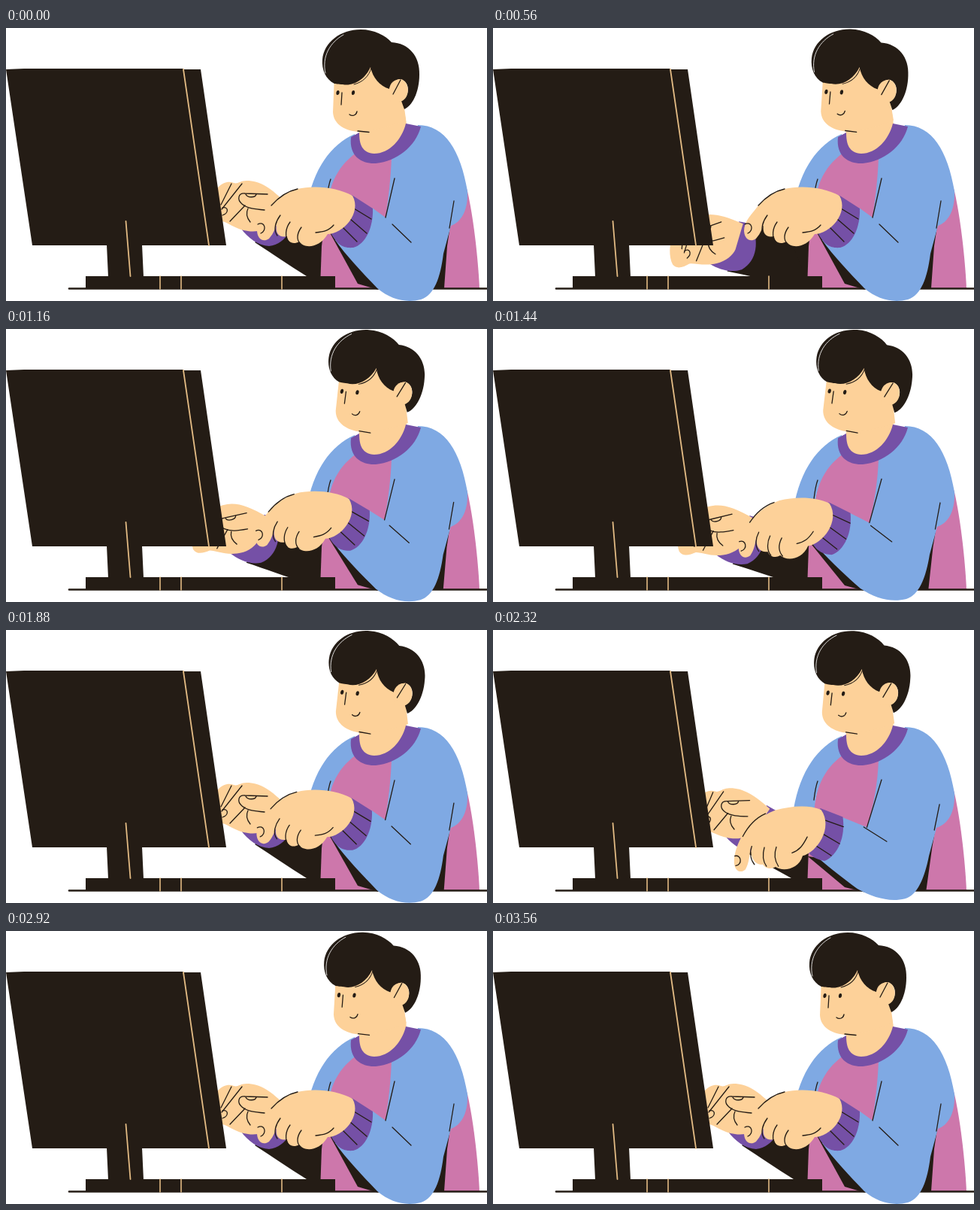
Write an HTML page with a canvas that moves like this. It is 640 by 363 pixels and loops after 3600 ms.

```html
<!DOCTYPE html>
<html lang="en">
<head>
<meta charset="utf-8">
<title>Typing at a desk</title>
<style>
html, body { margin: 0; width: 100%; height: 100%; overflow: hidden; background: #fff; }
canvas { display: block; }
</style>
</head>
<body>
<canvas id="stage" width="640" height="363"></canvas>
<script>
const ctx = document.getElementById('stage').getContext('2d');
const LOOP = 3600, TAP = 650;
const DARK = '#241c15', SKIN = '#fdd199', BLUE = '#7fa9e3', PINK = '#cd77ab', PURPLE = '#7550a6', TAN = '#e3bb84';
const backTaps = [310, 980, 2238], frontTaps = [600, 1275, 1945];

const fill = (d, color) => { ctx.fillStyle = color; ctx.fill(new Path2D(d)); };
const line = (d, color = DARK, width = 1.3) => {
  ctx.strokeStyle = color;
  ctx.lineWidth = width;
  ctx.stroke(new Path2D(d));
};
const ease = u => (1 - Math.cos(Math.PI * u)) / 2;

function tapAmount(starts, t) {
  const start = starts.find(s => t >= s && t < s + TAP);
  return start === undefined ? 0 : ease(2 * (t - start) / TAP);
}

// Blend two paths that share the same commands.
function blend(a, b, k) {
  const ends = b.match(/\d+/g);
  let i = 0;
  return a.replace(/\d+/g, n => (+n + (ends[i++] - n) * k).toFixed(2));
}

function turned(x, y, angle, draw) {
  ctx.save();
  ctx.translate(x, y);
  ctx.rotate(angle);
  ctx.translate(-x, -y);
  draw();
  ctx.restore();
}

function backArm(k) {
  fill('M402 330 L390 290 L402 250 H430 V330 Z', DARK);
  ctx.save();
  ctx.translate(-20 * k * k, 0);
  turned(430, 315, -0.43 * k, () => {
    fill('M380 240 L425 240 L425 330 L400 330 C377 316 353 299 331 285 Z', DARK);
    fill('M370 229 L384 238 C386 262 374 287 350 290 C335 289 322 279 313 267 C340 268 362 255 370 229 Z', PURPLE);
    fill('M374 234 C352 212 338 203 320 203 C312 203 308 208 303 206 C296 203 288 206 283 211 C272 224 266 238 267 250 ' +
      'C270 259 280 258 288 257 C296 259 306 268 322 270 C334 272 346 268 352 262 Z', SKIN);
    line('M300 207 L286 235 M314 207 L287 241 M318 236 L298 257');
    line('M288 239 C296 237 297 246 288 249');
    line('M348 221 L318 220 C309 219 307 228 314 234 C321 240 332 241 344 242');
    line('M319 221 C321 226 332 226 333 221 M322 240 C319 246 321 253 325 258');
  });
  ctx.restore();
}

function desk() {
  line('M84 346.5 H642', DARK, 2.6);
  fill('M106 330 H438 V347 H106 Z M134 288 H181 L183 331 H136 Z', DARK);
  fill('M0 55 L24 54 H236 V55 H259 L293 289 H35 Z', DARK);
  line('M236 55 L270 289 M159.5 257 L165.5 330', TAN, 1.8);
  line('M205 330 V347 M233 330 V347 M367 330 V347', TAN, 1.6);
}

function torso() {
  fill('M462 146 C440 178 430 210 425 250 L420 290 L418 346 H630 C628 305 622 252 614 217 C600 165 570 140 545 135 Z', PINK);
  fill('M464 141 C432 155 409 187 400 238 L400 250 L427 250 C428 214 438 186 466 166 Z', BLUE);
  line('M432 201 C429 209 428 218 427 226');
}

function frontArm(k) {
  const mix = (a, b) => blend(a, b, k);
  fill(mix('M427 265 L468 340 L495 348 L480 300 Z', 'M418 303 L468 342 L500 350 L470 310 Z'), DARK);
  fill(mix('M596 230 L587 290 L583 346 L560 346 L575 290 Z', 'M594 232 L584 290 L576 346 L550 346 L570 290 Z'), DARK);
  fill(mix(
    'M548 129 C584 129 605 163 614 217 C615 242 606 258 592 263 L582 300 C578 332 570 355 552 361 C532 366 512 361 494 346 C475 326 452 302 438 282 L487 239 L505 252 C509 225 512 200 513 172 C530 165 545 150 548 129 Z',
    'M548 129 C584 129 605 163 614 217 C615 242 606 258 590 263 L580 300 C574 330 564 353 548 357 C528 362 506 356 484 344 C467 332 449 318 434 306 L464 250 L497 263 C506 235 512 205 513 172 C530 165 545 150 548 129 Z'), BLUE);
  line(mix('M596 230 L590 266', 'M594 232 L587 266'));
  line(mix('M517 200 L505 252 M514 261 L539 285', 'M517 199 L497 263 M492 262 L523 281'));

  fill(mix('M460 222 L488 240 C489 265 478 288 462 292 C450 293 440 290 430 268 Z',
    'M434 238 L464 249 C468 275 458 300 440 308 C428 306 420 301 414 290 Z'), PURPLE);
  line(mix('M463 240 L486 254 M458 254 L480 273 M447 264 L467 284',
    'M441 254 L465 262 M439 273 L460 285 M428 288 L449 301'));

  fill(mix(
    'M461 223 C440 211 408 209 388 214 C370 219 356 232 350 240 C342 250 334 258 334 270 C335 282 343 285 350 280 C357 272 358 266 360 262 C358 274 364 279 374 277 C374 284 382 289 390 284 C396 293 416 294 428 274 C448 274 474 246 461 223 Z',
    'M435 240 C418 233 395 236 375 241 C352 250 336 266 329 278 C323 290 320 300 320 312 C321 324 329 326 335 321 C340 312 340 302 342 290 C341 306 348 315 358 314 C362 320 370 320 375 317 C384 323 406 321 411 302 C430 297 452 264 435 240 Z'), SKIN);
  line(mix('M353 236 C362 226 374 217 388 214', 'M331 277 C338 263 348 252 361 246'));
  line(mix('M335 261 C344 256 348 269 339 273', 'M321 303 C330 301 331 315 322 316'));
  line(mix(
    'M365 249 C359 257 355 268 361 276 M378 258 C372 266 370 278 377 285 M393 265 C387 273 386 282 392 287',
    'M343 290 C340 299 342 308 347 314 M360 291 C358 299 358 309 363 316 M376 290 C373 299 374 308 379 316'));
  line(mix('M436 262 C429 270 422 271 412 272', 'M417 276 C411 288 407 294 397 298'));
}

function neck() {
  fill('M470 128 L528 92 L533 128 C525 152 508 172 490 172 C472 170 468 152 470 136 Z', SKIN);
}

function collar() {
  fill('M459 145 C456 172 475 181 492 180 C520 177 545 158 552 131 L532 127 C527 148 510 167 490 167 C474 166 470 155 470 139 Z', PURPLE);
}

function head(blinking) {
  fill('M437 62 L435 112 C436 129 452 137 470 138 C495 137 518 128 532 122 L527 96 L525 60 L485 45 Z', SKIN);
  fill('M437 74 C425 68 420 55 421 42 C423 19 445 2 472 2 C490 2 505 10 513 19 C536 20 551 38 550 62 C550 86 540 104 530 108 ' +
    'L526 97 C537 92 539 72 525 68 C517 68 512 75 510 81 C497 77 488 66 485 52 C478 68 462 78 448 75 C442 75 438 74 437 74 Z', DARK);
  fill('M510 81 C511 73 517 68 525 68 C537 70 539 93 525 98 L512 98 Z', SKIN);
  line('M425 60 C420 38 431 19 449 9', '#fff', 0.8);
  line('M463 75 C475 72 483 64 486 53', DARK, 1);
  line('M525 69 L515 88 M447 86 L446 102 M457 115 C461 118 466 116 467 111 M468 137 L483 138.5');
  if (blinking) {
    line('M439 85 C440 88 443 88 444 85 M460 85 C461 88 464 88 465 85');
  } else {
    ctx.fillStyle = DARK;
    for (const x of [441.5, 462]) {
      ctx.beginPath();
      ctx.ellipse(x, 86, 2.1, 3.1, 0.15, 0, 2 * Math.PI);
      ctx.fill();
    }
  }
}

function render(t) {
  const lean = t < 1500 ? ease(t / 1500) : 1 - ease((t - 1500) / 2100);
  const tilt = 0.077 * lean;
  ctx.fillStyle = '#fff';
  ctx.fillRect(0, 0, 640, 363);
  ctx.lineCap = 'round';
  backArm(tapAmount(backTaps, t));
  torso();
  desk();
  frontArm(tapAmount(frontTaps, t));
  neck();
  collar();
  turned(490, 165, tilt, () => head(t >= 860 && t < 1000));
}

const began = performance.now();
function tick() {
  render((performance.now() - began) % LOOP);
  requestAnimationFrame(tick);
}
tick();
</script>
</body>
</html>
```
